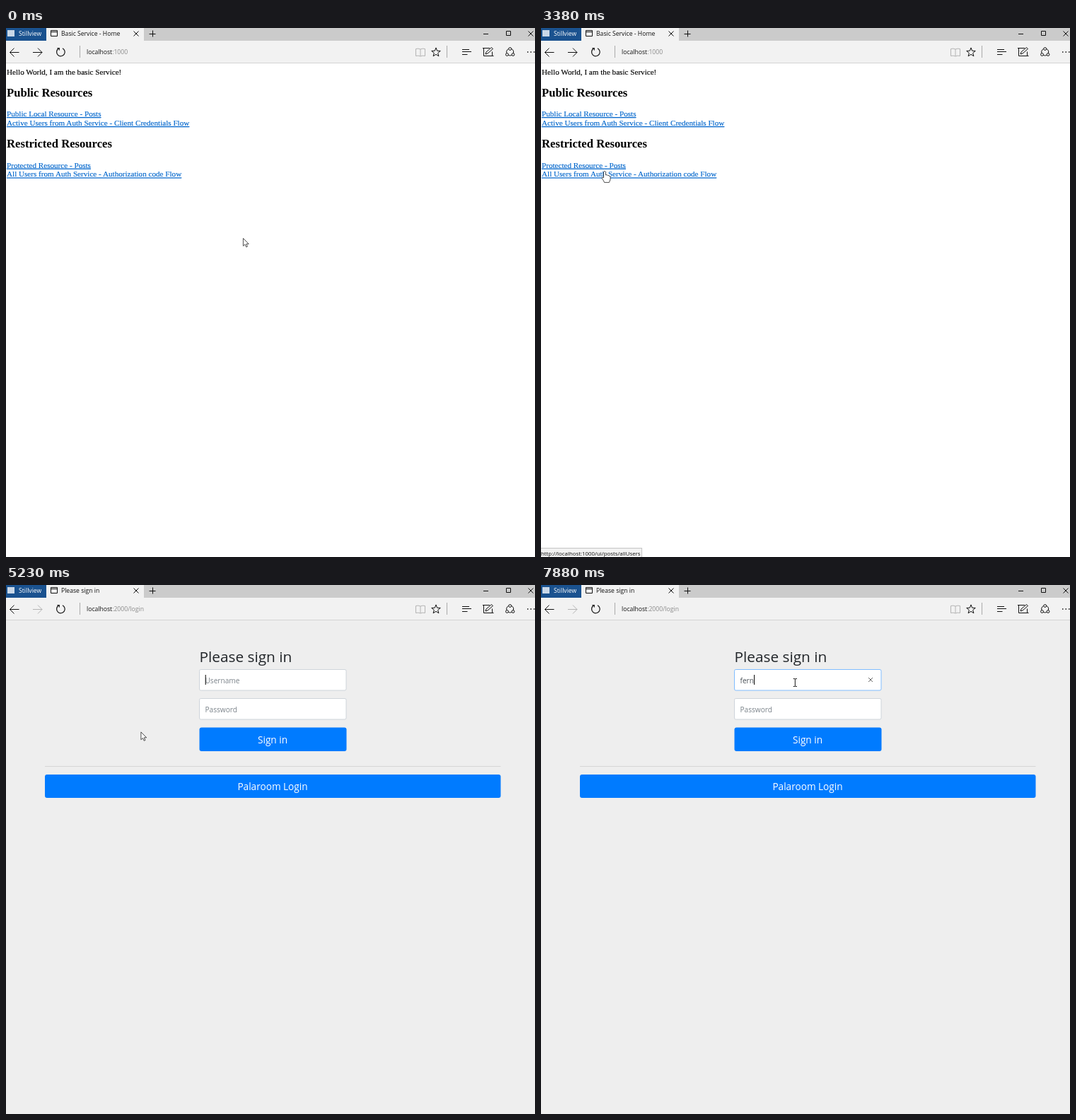
Write an HTML page that moves like this. It is 748 by 748 pixels and loops after 8000 ms.

```html
<!DOCTYPE html>
<html lang="en">
<head>
<meta charset="utf-8">
<title>Sign-in flow</title>
<style>
  html, body { margin: 0; width: 100%; height: 100%; overflow: hidden; }
  svg { display: block; width: 748px; height: 748px; }
  text { font-family: "Open Sans", "Noto Sans", sans-serif; font-size: 8.65px; fill: #111; white-space: pre; }
  .serif text { font-family: "Liberation Serif", serif; font-size: 11.13px; fill: #000; stroke: #000; stroke-width: .15; }
  .serif .head { font-size: 16.65px; font-weight: bold; stroke: none; }
  .serif .link { fill: #0066cc; stroke: #0066cc; text-decoration: underline; }
  .serif .visited { fill: #800080; stroke: #800080; }
  .icon { fill: none; stroke: #111; stroke-width: 1; }
  .dim { stroke: #b4b4b4; }
  .form text { font-size: 10.1px; fill: #495057; }
  .form .title { font-size: 20.8px; fill: #212529; }
  .form .hint { fill: #7b838a; }
  .form .label { font-size: 13.6px; fill: #fff; text-anchor: middle; }
  .field { fill: #fff; stroke: #ced4da; }
  .button { fill: #007bff; }
  .cursor { fill: #fff; stroke: #222; stroke-width: .8; stroke-linejoin: round; }
</style>
</head>
<body>
<svg viewBox="0 0 748 748">
  <rect width="748" height="748" fill="#fff"/>

  <g id="home" class="serif">
    <text x="1" y="66">Hello World, I am the basic Service!</text>
    <text x="1" y="97" class="head">Public Resources</text>
    <text x="1" y="125" class="link">Public Local Resource - Posts</text>
    <text x="1" y="138" class="link">Active Users from Auth Service - Client Credentials Flow</text>
    <text x="1" y="169" class="head">Restricted Resources</text>
    <text x="1" y="197.7" class="link">Protected Resource - Posts</text>
    <text x="1" y="210.4" class="link" id="allUsers">All Users from Auth Service - Authorization code Flow</text>
  </g>

  <g id="status">
    <rect id="statusBox" x="-1" y="735.5" height="14" fill="#f2f2f2" stroke="#c4c4c4"/>
    <text id="statusText" x="0" y="746" style="font-size:7.86px"></text>
  </g>

  <g id="login" class="form">
    <rect y="50" width="748" height="698" fill="#eee"/>
    <text x="273.5" y="109.3" class="title">Please sign in</text>
    <rect id="userField" x="273.5" y="119.5" width="207.5" height="29.5" rx="2" class="field"/>
    <text id="userHint" x="281.5" y="138.5" class="hint">Username</text>
    <text id="userText" x="281.5" y="138.5"></text>
    <rect id="caret" y="127" width="1" height="14" fill="#000"/>
    <path id="clear" class="icon" style="stroke:#666" d="M463 131l6 6m0-6l-6 6"/>
    <rect x="273.5" y="160.5" width="207.5" height="29.5" rx="2" class="field"/>
    <text x="281.5" y="180" class="hint">Password</text>
    <rect x="273.5" y="201.5" width="208" height="33.5" rx="3" class="button"/>
    <text x="377" y="223.7" class="label">Sign in</text>
    <path d="M55 256.5H699.5" stroke="#d5d5d5"/>
    <rect x="55" y="268" width="644.5" height="33" rx="3" class="button"/>
    <text x="377" y="290.3" class="label">Palaroom Login</text>
  </g>

  <g id="chrome">
    <rect width="748" height="18" fill="#cbcbcb"/>
    <rect width="57" height="18" fill="#1a528f"/>
    <rect x="2" y="3" width="10" height="9" fill="#c9d8e8"/>
    <text x="18" y="11.2" style="fill:#fff">Stillview</text>
    <path d="M57 0H195V18H748V49H0V18H57Z" fill="#f2f2f2"/>
    <path d="M0 49.5H748" stroke="#d4d4d4"/>
    <path id="pageIcon" class="icon" d="M63.5 3.5h9v8h-9zM63.5 5.5h9"/>
    <circle id="spinner" cx="63.7" cy="10.6" r=".8" fill="#555"/>
    <text id="tabTitle" y="11.2"></text>
    <path class="icon" d="M180.5 4.5l7 7m0-7l-7 7M202.5 8.5h9M207.5 3.5v9M675 8.500h7M707.5 4.5h6v6h-6zM738.5 4.5l7 7m0-7l-7 7"/>

    <path class="icon" d="M18.5 34.5H5.5m6-6l-6 6l6 6"/>
    <path id="forward" class="icon" d="M38 34.5h13m-6-6l6 6l-6 6"/>
    <path id="refresh" class="icon" style="stroke-width:1.2" d="M74 29.3A5.8 5.8 0 1 0 80 28.8M72.5 28.6h2.8v3"/>
    <path id="stop" class="icon" d="M72.5 29l10 10m0-10l-10 10"/>
    <path class="icon" style="stroke:#aaa" d="M104.5 25v17M623.5 25v17"/>
    <text x="114" y="37.2">localhost<tspan id="urlTail" fill="#8a8a8a"></tspan></text>
    <path class="icon dim" d="M586 30v10M586 30q-3-1.5-6.5-.5v10q3.5-1 6.5 .5q3-1.5 6.5-.5v-10q-3.5-1-6.5 .5"/>
    <path id="star" class="icon"/>
    <path class="icon" d="M645 30.5h10M645 33.5h13M645 37.5h7.5"/>
    <path class="icon" d="M684 28.5h-8.5v11h12v-6M678 37l1-3l7.500-6.5l2 2l-7.5 6.5zM674 28.5h3M687.5 39.5h2"/>
    <g id="share" class="icon">
      <circle cx="712.7" cy="34" r="5"/>
      <g fill="#f2f2f2">
        <circle cx="712.7" cy="29.5" r="1.9"/>
        <circle cx="708.5" cy="37.5" r="1.9"/>
        <circle cx="717" cy="37.5" r="1.9"/>
      </g>
    </g>
    <path d="M737 34h1.5M741.5 34h1.5M746 34h1.5" stroke="#111" stroke-width="1.5"/>
  </g>

  <circle id="click" r="10.3" fill="#ff0" fill-opacity=".47"/>
  <g id="pointer">
    <path id="arrow" class="cursor" d="M.4.4V11.2L2.9 8.9L4.7 12.700L6.4 12L4.8 8.300H8.200z"/>
    <path id="hand" class="cursor" d="M-1.5 1Q0-1.3 1.5 1V5.5Q4 4.6 4.3 6.3Q6 5.5 6.5 7Q8 6.8 8 8.5V11.5Q7.5 13.5 6.3 16H-.5Q-1 14-4 10Q-3.8 7.7-1.5 9.3z"/>
    <path id="beam" class="icon" d="M-2.5-5.5H-.8L0-5L.8-5.5H2.5M0-5V5M-2.5 5.5H-.8L0 5L.8 5.5H2.5"/>
  </g>
</svg>

<script>
const LOOP = 8000, LOADING = 5040, LOADED = 5230;
const $ = id => document.getElementById(id);
const show = (id, on) => { $(id).style.display = on ? "" : "none"; };

// Each move: start, end, steps, control point, end point of a quadratic curve
const moves = [
  [210, 970, 11, 290, 342, 77, 256],
  [1060, 1840, 11, 30, 235, 19, 198],
  [1920, 1920, 1, 19, 200, 20, 203],
  [2070, 2070, 1, 18, 203, 17, 204.5],
  [2920, 3700, 11, 69, 196, 138, 209],
  [3780, 4100, 5, 165, 209, 190.5, 209],
  [4570, 4640, 2, 190.5, 208, 190.5, 207.5],
  [5590, 6000, 6, 280, 165, 359.3, 138]
];

// Start times of the typed letters
const name = "fern", keys = [7240, 7540, 7710, 7880];

// The pointer is sampled at a fixed number of steps per move
function pointerAt(t) {
  let x = 335, y = 297;
  for (const [start, end, steps, cx, cy, ex, ey] of moves) {
    if (t < start) break;
    const gap = (end - start) / (steps - 1) || 1;
    const p = Math.min(steps, Math.floor((t - start) / gap + .2) + 1) / steps;
    const curve = (a, b, c) => (1 - p) ** 2 * a + 2 * p * (1 - p) * b + p * p * c;
    x = curve(x, cx, ex);
    y = curve(y, cy, ey);
  }
  return [x, y];
}

function hoveredUrl(x, y) {
  const base = "http://localhost:1000/ui/posts";
  if (y > 188 && y < 200.5 && x < 120) return base;
  if (y >= 200.5 && y < 214 && x < 249) return base + "/allUsers";
  return "";
}

function draw(t) {
  const login = t >= LOADED, loading = t >= LOADING && !login;
  const [x, y] = pointerAt(t);
  const url = login ? "" : hoveredUrl(x, y);

  show("home", !login);
  show("login", login);
  show("pageIcon", !loading);
  show("refresh", !loading);
  show("spinner", loading);
  show("stop", loading);
  $("tabTitle").textContent = login ? "Please sign in" : "Basic Service - Home";
  $("tabTitle").setAttribute("x", loading ? 79.5 : 78);
  $("urlTail").textContent = login ? ":2000/login" : ":1000";
  $("forward").classList.toggle("dim", login);
  $("share").classList.toggle("dim", loading);
  $("allUsers").classList.toggle("visited", loading);

  show("status", url);
  if (url) {
    $("statusText").textContent = url;
    $("statusBox").setAttribute("width", $("statusText").getComputedTextLength() + 3);
  }

  if (login) {
    const typed = keys.filter(k => t >= k).length;
    $("userText").textContent = name.slice(0, typed);
    $("caret").setAttribute("x", 281.7 + (typed && $("userText").getComputedTextLength()));
    show("userHint", !typed);
    show("clear", t >= 7310);
    show("caret", typed || Math.floor((t - LOADED) / 540) % 2 === 0);
    $("userField").style.stroke = t >= 5300 ? "#80bdff" : "";
  }

  const inField = login && x > 274 && x < 481 && y > 119 && y < 149;
  const onLink = url && !loading;
  show("beam", inField);
  show("hand", onLink);
  show("arrow", !inField && !onLink);
  $("pointer").setAttribute("transform", `translate(${x} ${y})`);

  show("click", t >= 4800 && t < LOADING || t >= 6380 && t < 6570);
  $("click").setAttribute("cx", login ? x - 1.5 : x);
  $("click").setAttribute("cy", y);
}

const starPoints = Array.from({ length: 10 }, (_, i) => {
  const r = i % 2 ? 2.8 : 6.6, a = (i / 5 - .5) * Math.PI;
  return `${608 + r * Math.cos(a)} ${34.5 + r * Math.sin(a)}`;
});
$("star").setAttribute("d", `M${starPoints.join("L")}Z`);

const begin = performance.now();
function tick() {
  draw((performance.now() - begin) % LOOP);
  requestAnimationFrame(tick);
}
tick();
</script>
</body>
</html>
```
